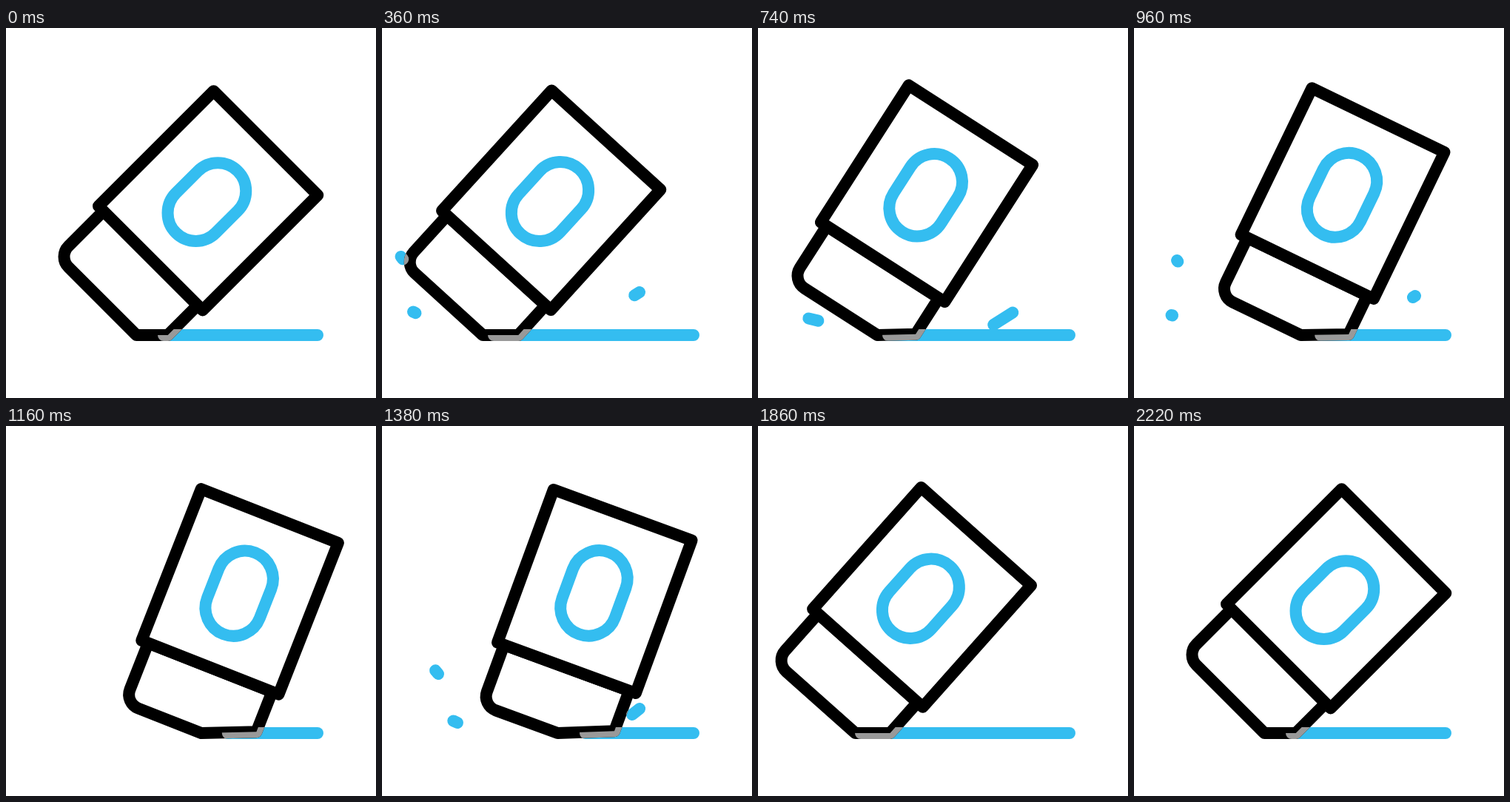
Recreate the animation shown at these times as an HTML page with a canvas. Size 500 by 500 pixels, loop 3000 ms.

```html
<!DOCTYPE html>
<html lang="en">
<head>
<meta charset="utf-8">
<title>Eraser</title>
<style>
  html, body { margin: 0; width: 100%; height: 100%; overflow: hidden; background: #fff; }
  canvas { display: block; width: 500px; height: 500px; }
</style>
</head>
<body>
<canvas id="stage" width="500" height="500"></canvas>
<script>
const SIZE = 500, LOOP = 3000, STEP = 20, STROKE = 16, GROUND = 415;
const BLACK = '#000', WHITE = '#fff', BLUE = '#34bdf0', GRAY = '#999';

const ctx = document.getElementById('stage').getContext('2d');
const overlay = document.createElement('canvas');
overlay.width = overlay.height = SIZE;
const octx = overlay.getContext('2d');

// Keys are [ms, value]; the pivot is the lower right corner of the rubber tip.
const pivotX = [[0, 218], [360, 182], [500, 173], [740, 213], [960, 290], [1240, 345],
  [1380, 314], [1760, 168], [1860, 177], [2220, 218]];
const pivotY = [[0, 415.7], [360, 417.5], [740, 413.7], [960, 414], [1380, 412.2],
  [1860, 416.7], [2220, 415.7]];
const tilt = [[0, 45], [360, 42.35], [740, 32.7], [960, 25.8], [1330, 19.7], [1860, 41.7], [2220, 45]];
const lineLag = [[0, 5], [360, 31], [500, 36], [740, 37], [1380, 39], [1860, 38], [2220, 5]];

// Crumbs run from the first point to the second: [x1, y1, x2, y2]
const bursts = [
  { start: 20, crumbs: [[283, 398, 348, 357], [52, 341, 25.5, 309], [75, 400, 42, 383.5]] },
  { start: 600, crumbs: [[315, 403, 380, 362], [85, 346, 58, 314], [83, 396, 50.5, 388]] },
  { start: 1280, crumbs: [[338, 390, 377, 359], [76, 335, 61, 317], [102, 401, 80, 391]] }
];
const BURST_TIME = 400;

const mix = (a, b, k) => a + (b - a) * k;
const smooth = x => {
  const k = Math.min(1, Math.max(0, x));
  return k * k * (3 - 2 * k);
};

// Cubic through the keys, flat at turning points and at both ends
function slopeAt(keys, i) {
  if (i === 0 || i === keys.length - 1) return 0;
  const [[t0, v0], [, v1], [t2, v2]] = keys.slice(i - 1, i + 2);
  return (v1 - v0) * (v2 - v1) <= 0 ? 0 : (v2 - v0) / (t2 - t0);
}

function sample(keys, t) {
  const next = keys.findIndex(key => key[0] > t);
  if (next < 0) return keys[keys.length - 1][1];
  const [t0, v0] = keys[next - 1], [t1, v1] = keys[next];
  const span = t1 - t0, s = (t - t0) / span;
  return mix(v0, v1, smooth(s))
    + span * s * (1 - s) * ((1 - s) * slopeAt(keys, next - 1) - s * slopeAt(keys, next));
}

function bluePath(t, lineStart) {
  const path = new Path2D();
  path.moveTo(lineStart, GROUND);
  path.lineTo(421, GROUND);
  for (const { start, crumbs } of bursts) {
    const p = (t - start) / BURST_TIME;
    if (p <= 0 || p >= 1) continue;
    const head = smooth(p / 0.75), tail = smooth((p - 0.25) / 0.75);
    for (const [x1, y1, x2, y2] of crumbs) {
      path.moveTo(mix(x1, x2, tail), mix(y1, y2, tail));
      path.lineTo(mix(x1, x2, head), mix(y1, y2, head));
    }
  }
  return path;
}

// The tip is cut off where it meets the ground.
function tipPath(y, angle) {
  const sin = Math.sin(angle), cos = Math.cos(angle), bottom = 29;
  const path = new Path2D();
  path.moveTo(0, -58);
  path.lineTo(0, Math.min(0, GROUND - y) / cos);
  path.lineTo((GROUND - y - bottom * cos) / sin, bottom);
  path.arcTo(-180, bottom, -180, -58, 20);
  path.lineTo(-180, -58);
  path.closePath();
  return path;
}

const bodyPath = new Path2D();
bodyPath.rect(-189.5, -278, 199, 220);

const pillPath = new Path2D();
pillPath.arc(-90, -186.5, 38, Math.PI, 0);
pillPath.arc(-90, -144.5, 38, 0, Math.PI);
pillPath.closePath();

function stroke(c, path, color) {
  c.lineWidth = STROKE;
  c.lineCap = c.lineJoin = 'round';
  c.strokeStyle = color;
  c.stroke(path);
}

function outlined(c, path) {
  c.fillStyle = WHITE;
  c.fill(path);
  stroke(c, path, BLACK);
}

function place(c, x, y, angle) {
  c.translate(x, y);
  c.rotate(angle);
}

// Gray where blue parts meet the outer half of the tip's outline
function drawOverlap(blue, tip, x, y, angle) {
  octx.clearRect(0, 0, SIZE, SIZE);
  octx.save();
  place(octx, x, y, angle);
  stroke(octx, tip, BLACK);
  octx.globalCompositeOperation = 'destination-out';
  octx.fill(tip);
  octx.restore();
  octx.save();
  octx.globalCompositeOperation = 'source-in';
  stroke(octx, blue, GRAY);
  octx.restore();
  ctx.drawImage(overlay, 0, 0);
}

function draw(t) {
  const x = sample(pivotX, t), y = sample(pivotY, t);
  const angle = sample(tilt, t) * Math.PI / 180;
  const blue = bluePath(t, x - sample(lineLag, t));
  const tip = tipPath(y, angle);

  ctx.fillStyle = WHITE;
  ctx.fillRect(0, 0, SIZE, SIZE);
  stroke(ctx, blue, BLUE);

  ctx.save();
  place(ctx, x, y, angle);
  outlined(ctx, tip);
  ctx.restore();

  drawOverlap(blue, tip, x, y, angle);

  ctx.save();
  place(ctx, x, y, angle);
  outlined(ctx, bodyPath);
  stroke(ctx, pillPath, BLUE);
  ctx.restore();
}

let origin;
function tick(now) {
  origin ??= now;
  const t = (now - origin) % LOOP;
  draw(Math.floor(t / STEP) * STEP);
  requestAnimationFrame(tick);
}
draw(0);
requestAnimationFrame(tick);
</script>
</body>
</html>
```
